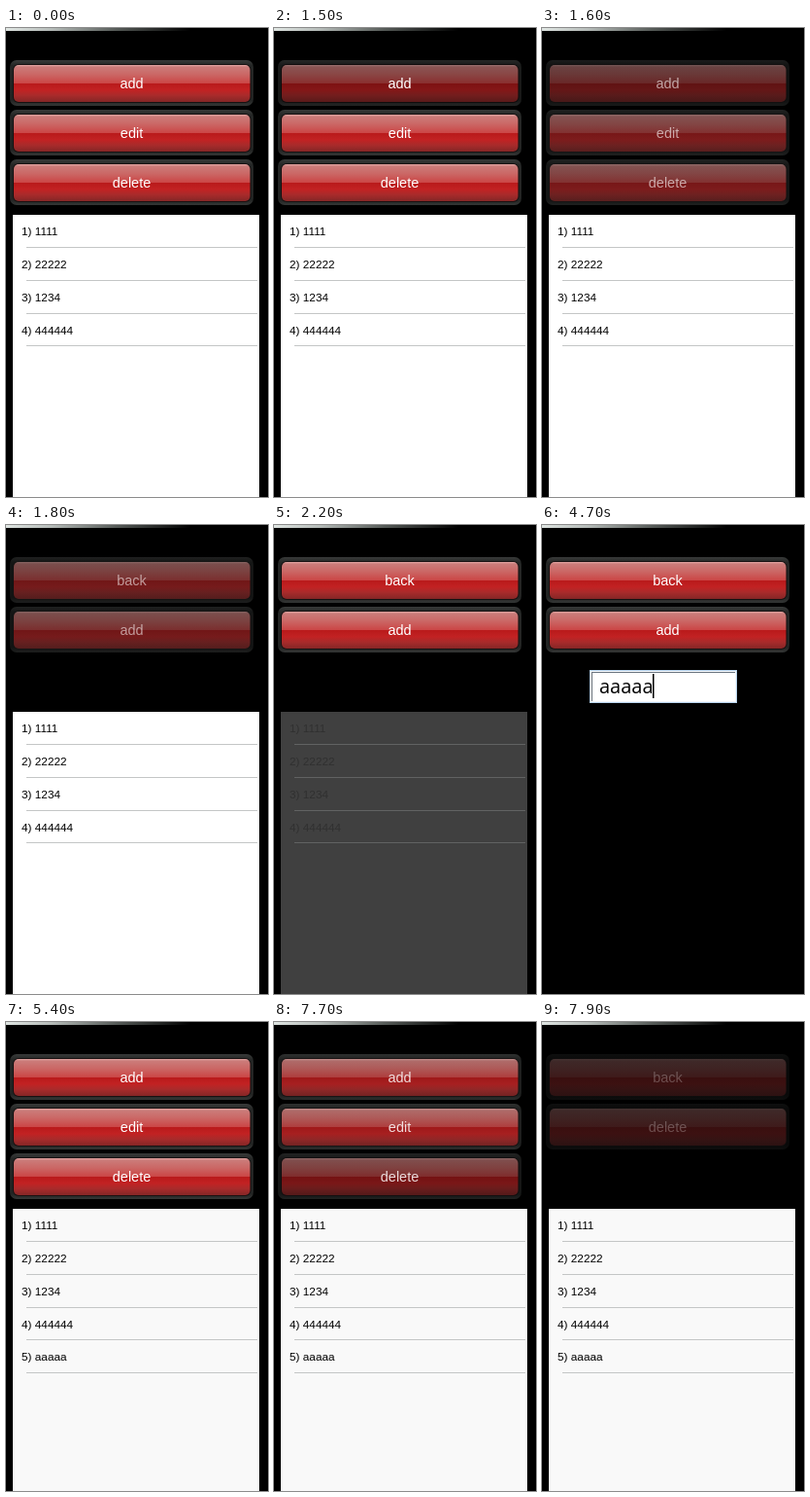
An HTML page with a canvas that plays this animation: 270 by 482 pixels, repeating every 8 s.

```html
<!DOCTYPE html>
<html lang="en">
<head>
<meta charset="utf-8">
<title>List editor</title>
<style>
html, body { margin: 0; width: 100%; height: 100%; overflow: hidden; background: #000; }
canvas { display: block; width: 270px; height: 482px; }
</style>
</head>
<body>
<canvas id="stage" width="270" height="482"></canvas>
<script>
const ctx = document.getElementById('stage').getContext('2d');
const LOOP = 8000;
const STEP = 100;
const SANS = '"Liberation Sans", Arial, sans-serif';
const MAIN = ['add', 'edit', 'delete'];
const ITEMS = ['1111', '22222', '1234', '444444', 'aaaaa'];
const TYPED_AT = [4000, 4200, 4400, 4500, 4700];

const clamp = v => Math.max(0, Math.min(1, v));

function gradient(x0, y0, x1, y1, stops) {
  const g = ctx.createLinearGradient(x0, y0, x1, y1);
  stops.forEach(([at, color]) => g.addColorStop(at, color));
  return g;
}

function rect(x, y, w, h, color) {
  ctx.fillStyle = color;
  ctx.fillRect(x, y, w, h);
}

function rounded(x, y, w, h, r, color) {
  ctx.beginPath();
  ctx.roundRect(x, y, w, h, r);
  ctx.fillStyle = color;
  ctx.fill();
}

function text(str, x, y, font, color, align = 'left') {
  ctx.font = font;
  ctx.textAlign = align;
  ctx.fillStyle = color;
  ctx.fillText(str, x, y);
}

function button(label, row, pressed) {
  const y = 33 + row * 51;
  rounded(4, y, 251, 47, 7, gradient(0, y, 0, y + 47,
    [[0, '#383a39'], [0.12, '#252726'], [0.88, '#222423'], [1, '#343635']]));
  rounded(7, y + 4, 245.5, 40, 6, '#171111');
  rounded(8, y + 5, 243.5, 38, 5, gradient(0, y + 5, 0, y + 43, [
    [0, '#e0a5a2'], [0.06, '#cb7b79'], [0.25, '#cb6866'], [0.5, '#cb4545'],
    [0.51, '#b91a1b'], [0.68, '#c22223'], [0.82, '#a92b2b'], [1, '#852626']
  ]));
  if (pressed) rounded(4, y, 251, 47, 7, 'rgba(0,0,0,.32)');
  text(label, 129.5, y + 29, '14.5px ' + SANS, '#fff', 'center');
}

function buttons(labels, alpha, pressed = -1) {
  ctx.globalAlpha = alpha;
  labels.forEach((label, i) => button(label, i, i === pressed));
  ctx.globalAlpha = 1;
}

function list(count, paper, alpha = 1) {
  ctx.globalAlpha = alpha;
  rect(7, 192, 254, 290, paper);
  for (let i = 0; i < count; i++) {
    const y = i * 33.75;
    text(`${i + 1}) ${ITEMS[i]}`, 16, Math.round(213.4 + y), '11.8px ' + SANS, '#000');
    rect(21, Math.round(225 + y), 238, 1, '#c4c6c6');
  }
  ctx.globalAlpha = 1;
}

function field(t) {
  const focus = clamp((t - 2500) / 400);
  ctx.globalAlpha = clamp((t - 2300) / 300);
  rect(49, 149, 152, 34, '#e3e6ea');
  ctx.globalAlpha *= focus;
  rect(49, 149, 152, 34, '#b9d5ee');
  ctx.globalAlpha = clamp((t - 2300) / 300);
  rect(50, 150, 150, 32, '#f4f7fa');
  rect(51, 151, 148, 30, '#6c7680');
  rect(52, 152, 147, 29, '#fff');

  const font = '20px "Open Sans", "Noto Sans", sans-serif';
  const typed = TYPED_AT.filter(at => t >= at).length;
  const selected = !typed && t >= 2600;
  if (selected) rect(59, 153, 34, 25, '#3399ff');
  text(typed ? 'a'.repeat(typed) : '123', 59, 173, font, selected ? '#fff' : '#000');

  // The blink restarts with every keystroke.
  const since = t - (typed ? TYPED_AT[typed - 1] : 2600);
  if (since >= 0 && since % 1000 < 500) {
    rect(59 + typed * 11, 153, 1.5, 25, typed ? '#000' : '#cc6600');
  }
  ctx.globalAlpha = 1;
}

function draw(t) {
  rect(0, 0, 270, 482, '#000');
  rect(0, 0, 270, 3, gradient(0, 0, 190, 0,
    [[0, '#dfe5e2'], [0.25, '#b4bab7'], [0.6, '#555a57'], [1, '#000']]));

  if (t < 1700) {
    buttons(MAIN, t < 1600 ? 1 : 0.6, t < 1500 ? -1 : 0);
    list(4, '#fff');
  } else if (t < 5400) {
    buttons(['back', 'add'], clamp(0.25 + (t - 1700) * 0.0031));
    if (t < 2300) list(4, '#fff', clamp((2300 - t) / 400));
    if (t >= 2400) field(t);
  } else {
    if (t < 7900) {
      buttons(MAIN, t < 7700 ? 1 : 0.84 - (t - 7700) * 0.0037, t < 7700 ? -1 : 2);
    } else {
      buttons(['back', 'delete'], 0.26);
    }
    list(5, '#f9f9f9');
  }
}

function frame() {
  const t = performance.now() % LOOP;
  draw(Math.floor(t / STEP) * STEP);
  requestAnimationFrame(frame);
}
frame();
</script>
</body>
</html>
```
